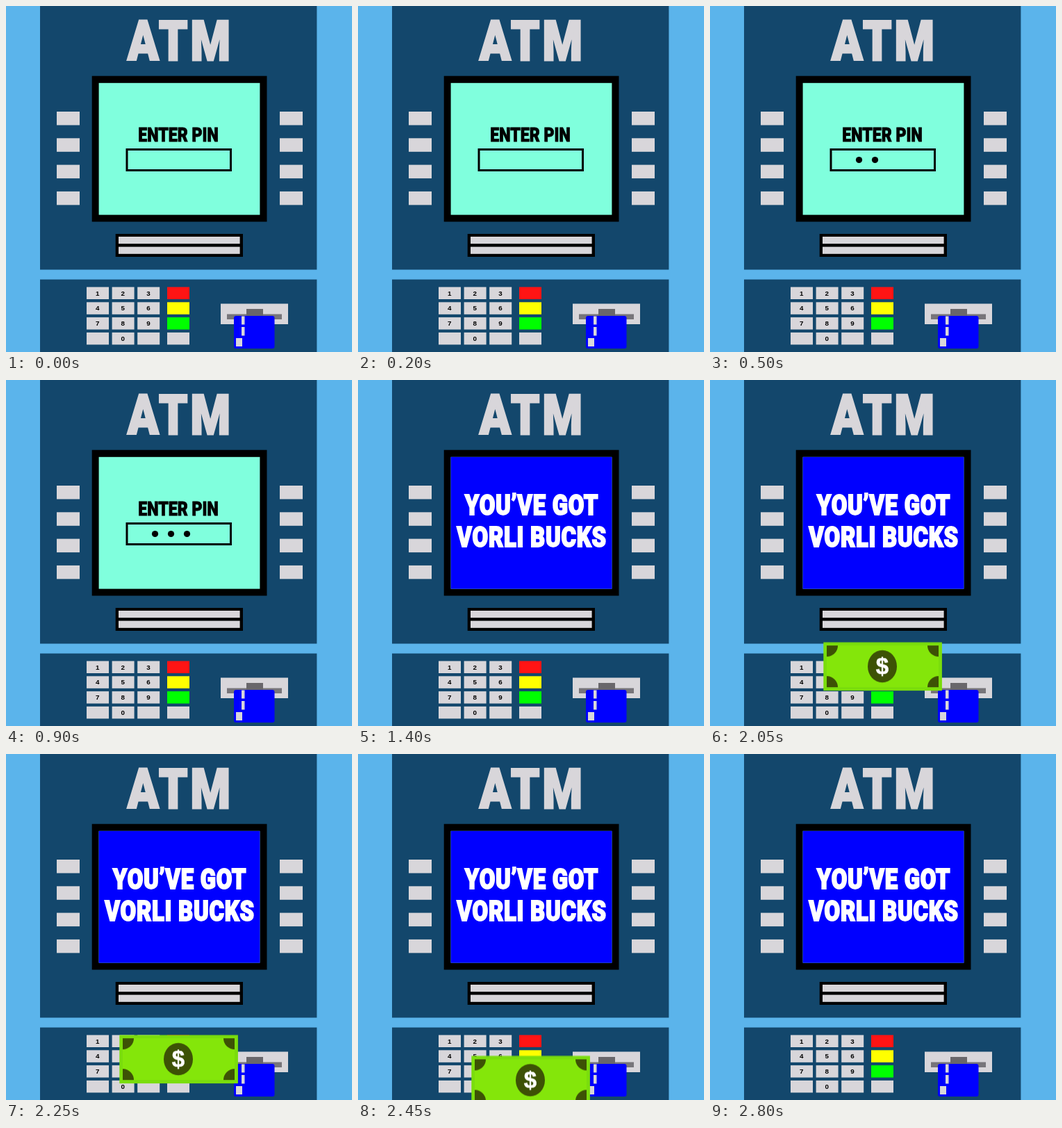
An HTML page for the animation above (2.85 s loop, 498 by 498 pixels).

```html
<!DOCTYPE html>
<html lang="en">
<head>
<meta charset="utf-8">
<title>Cash machine</title>
<style>
  html, body { margin: 0; width: 100%; height: 100%; overflow: hidden; background: #5bb4eb; }
  svg { display: block; width: 100%; height: 100%; }
  .panel { fill: #13476c; }
  .grey { fill: #d8d6da; }
  .title { font-family: Roboto, "Open Sans", sans-serif; font-weight: 900; text-anchor: middle; stroke-linejoin: miter; }
  .brand { font-size: 80px; letter-spacing: 5px; stroke: #d8d6da; stroke-width: 3; }
  .prompt { font-size: 28.2px; stroke: #000; stroke-width: .9; }
  .notice { font-size: 40px; letter-spacing: .9px; fill: #fff; stroke: #fff; stroke-width: 2; }
  .key { font: bold 9.8px "Liberation Sans", Arial, sans-serif; text-anchor: middle; }
  .dollar { font: bold 33px "Liberation Sans", Arial, sans-serif; text-anchor: middle; fill: #fff; stroke: #fff; stroke-width: .6; }

  .dot, .message { animation: 2850ms step-end infinite; }
  .dot:nth-child(1) { animation-name: first; }
  .dot:nth-child(2) { animation-name: second; }
  .dot:nth-child(3) { animation-name: third; }
  .dot:nth-child(4) { animation-name: fourth; }
  .message { animation-name: message; }
  @keyframes first   { 0% { opacity: 0 }  8.6%, 100% { opacity: 1 } }
  @keyframes second  { 0% { opacity: 0 } 17.3%, 100% { opacity: 1 } }
  @keyframes third   { 0% { opacity: 0 } 26.1%, 100% { opacity: 1 } }
  @keyframes fourth  { 0% { opacity: 0 } 34.9%, 100% { opacity: 1 } }
  @keyframes message { 0% { opacity: 0 } 43.6%, 100% { opacity: 1 } }

  /* Steady feed out of the slot, then a slight speed-up off the stage. */
  .bill { animation: feed 2850ms linear infinite; }
  @keyframes feed {
    0%, 49.58% { transform: translateY(-86px); }
    78.95% { transform: translateY(27px); animation-timing-function: cubic-bezier(.333, .258, .667, .591); }
    98.2%, 100% { transform: translateY(124px); }
  }
</style>
</head>
<body>
<svg viewBox="0 0 498 498">
  <defs>
    <clipPath id="belowSlot"><rect y="361" width="498" height="137"/></clipPath>
    <clipPath id="billFace"><rect x="168" y="382" width="161" height="60"/></clipPath>
  </defs>

  <rect width="498" height="498" fill="#5bb4eb"/>
  <rect class="panel" x="49" width="398.4" height="379.5"/>
  <rect class="panel" x="49" y="393.6" width="398.4" height="105"/>
  <g transform="translate(251 78.3) scale(.82 1)">
    <text class="title brand grey">ATM</text>
  </g>
  <g id="sideButtons" class="grey"></g>

  <rect x="123.7" y="100.7" width="251.8" height="209.8"/>
  <rect x="133.6" y="110.8" width="231.8" height="189.8" fill="#80ffdd"/>
  <g transform="translate(248 195) scale(.82 1)">
    <text class="title prompt">ENTER PIN</text>
  </g>
  <rect x="174" y="206.5" width="149.5" height="30" fill="none" stroke="#000" stroke-width="3"/>
  <g>
    <circle class="dot" cx="214.5" cy="221.5" r="4.6"/>
    <circle class="dot" cx="237.5" cy="221.5" r="4.6"/>
    <circle class="dot" cx="260.5" cy="221.5" r="4.6"/>
    <circle class="dot" cx="283.5" cy="221.5" r="4.6"/>
  </g>
  <g class="message">
    <rect x="133.6" y="110.8" width="231.8" height="189.8" fill="#00f"/>
    <g transform="translate(250 194) scale(.82 1)">
      <text class="title notice">YOU’VE GOT</text>
      <text class="title notice" y="46">VORLI BUCKS</text>
    </g>
  </g>

  <rect x="157.7" y="328" width="183.3" height="33"/>
  <rect class="grey" x="162" y="332" width="174.6" height="10.2"/>
  <rect class="grey" x="162" y="346.6" width="174.6" height="10.2"/>

  <g id="keypad"></g>

  <rect class="grey" x="309" y="428.5" width="97" height="29.5"/>
  <rect x="318" y="443.5" width="79" height="7.5" fill="#77757a"/>
  <rect x="346" y="436" width="24" height="10" fill="#69676b"/>
  <rect x="328" y="446" width="58.5" height="47" rx="3" fill="#00f"/>
  <g class="grey">
    <rect x="339" y="446.5" width="4.5" height="12"/>
    <rect x="339" y="462" width="4.5" height="12.5"/>
    <rect x="331" y="478" width="9" height="12"/>
  </g>

  <g clip-path="url(#belowSlot)">
    <g class="bill">
      <rect x="163.3" y="377.4" width="170.6" height="69.6" fill="#7add0c"/>
      <rect x="168" y="382" width="161" height="60" fill="#84e60a"/>
      <g clip-path="url(#billFace)" fill="#3d5205">
        <circle cx="168" cy="382" r="16"/>
        <circle cx="329" cy="382" r="16"/>
        <circle cx="168" cy="442" r="16"/>
        <circle cx="329" cy="442" r="16"/>
      </g>
      <ellipse cx="248" cy="412" rx="21" ry="23.3" fill="#3d5205"/>
      <text class="dollar" x="248" y="423">$</text>
    </g>
  </g>
</svg>
<script>
  const rect = (x, y, w, h, fill) => `<rect x="${x}" y="${y}" width="${w}" height="${h}" fill="${fill}"/>`;
  const grey = '#d8d6da';
  const rows = ['123', '456', '789', ' 0 '];
  const actions = ['#ff1414', '#ffff00', '#00ff00', grey];
  let keys = '', buttons = '';

  rows.forEach((row, r) => {
    const y = 404.5 + r * 21.8, sideY = 152 + r * 38.3;
    [...row].forEach((label, c) => {
      const x = 116 + c * 36.6;
      keys += rect(x, y, 32, 17.5, grey) + `<text class="key" x="${x + 15.7}" y="${y + 12}">${label}</text>`;
    });
    keys += rect(232, y, 32, 17.5, actions[r]);
    buttons += rect(73, sideY, 33, 19.5, grey) + rect(394, sideY, 33, 19.5, grey);
  });

  document.getElementById('keypad').innerHTML = keys;
  document.getElementById('sideButtons').innerHTML = buttons;
</script>
</body>
</html>
```
